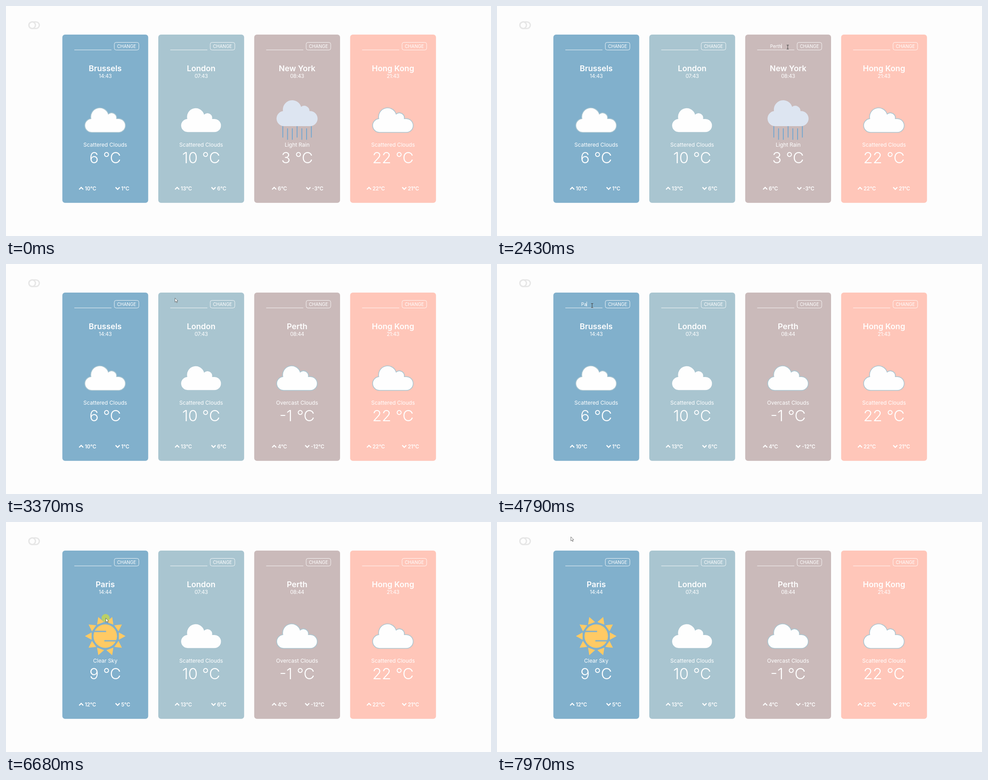
An HTML page for the animation above (8 s loop, 1086 px wide and 515 px high).

```html
<!DOCTYPE html>
<html lang="en">
<head>
<meta charset="utf-8">
<title>Weather cards</title>
<style>
html, body { margin: 0; width: 100%; height: 100%; overflow: hidden; background: #fdfdfd; }
svg { display: block; width: 1086px; height: 515px; font-family: Montserrat, Inter, "Open Sans", sans-serif; }
text { text-anchor: middle; white-space: pre; }
.city { font-size: 17.7px; font-weight: 600; }
.time { font-size: 11.7px; letter-spacing: -.35px; }
.sky { font-size: 12px; }
.temp { font-size: 34.5px; font-weight: 350; }
.range { font-size: 11.3px; font-weight: 600; text-anchor: start; }
.small { font-size: 11.4px; text-anchor: start; }
.day { font-size: 20.3px; font-weight: 350; }
.tiny { font-size: 10px; }
.line { fill: none; stroke: #fff; }
.thin { stroke-width: .85; }
</style>
</head>
<body>
<svg id="stage" viewBox="0 0 1086 515"></svg>
<script>
const LOOP = 8000;
const stage = document.getElementById('stage');
const SUN = '#ffca64', GREY = '#727072', PANEL = '#d8d3d0';
const TINTS = ['#81b0cc', '#a9c5d0', '#cababa', '#ffc6b9'];
const cardX = i => 222.2 + i * 214.8;
const label = (cls, x, y, s) => `<text class="${cls}" x="${x}" y="${y}">${s}</text>`;
const repeat = (n, fn) => Array.from({ length: n }, (_, i) => fn(i)).join('');

// Weather icons, centred on x = 0
const cloud = `<path d="M-30 283A15.4 15.4 0 0 1 -32 252.3A20.2 20.2 0 0 1 7 242A11.2 11.2 0 0 1 25.3 252.3
  H29.8A15.3 15.3 0 0 1 29.8 283Z" fill="#fefefe" stroke="#a9c5d0" stroke-width="1.6"/>`;

const drops = repeat(7, i => `M${-32 + i * 10.65} ${i % 3 ? 274 : 269}v25.5`);
const rain = `<path d="${drops}" stroke="#6ea5d1" stroke-width="1.8"/>
  <path d="M-29 269A17 17 0 0 1 -31.6 235.2A20.9 20.9 0 0 1 9 225.7A11.8 11.8 0 0 1 27.8 235.2H29A16.9 16.9 0 0 1 29 269Z" fill="#dde5f1"/>`;

const sun = bg => {
  const rays = repeat(10, i => {
    const angle = (i % 5 - 2) * 35 + (i < 5 ? 0 : 180);
    return `<path d="M45.5 0L30.5 -8.3V8.3Z" transform="rotate(${angle})"/>`;
  });
  return `<g transform="translate(0 255.5)" fill="${SUN}">${rays}<circle r="26.3"/>
    <path d="M-27 -10.5H2M-2 10.5H27" stroke="${bg}" stroke-width="2.8"/></g>`;
};

// Chevron and temperature, centred together on x; dir 1 points up
function range(x, dir, deg) {
  const width = 27.8 + 5 * String(deg).length;
  const left = x - width / 2;
  return `<path class="line" stroke-width="2.3" d="M${left} ${408.3 + 2.4 * dir}l4.6 ${-4.6 * dir}l4.6 ${4.6 * dir}"/>` +
    label('range', left + 12.6, 412.5, deg + '°C');
}

// A card is drawn around its own centre line
function card(id, i, city, time, icon, sky, temp, max, min) {
  return `<g id="${id}" transform="translate(${cardX(i)} 0)" fill="#fff">
    <rect x="-96" y="64" width="192.2" height="376.8" rx="6" fill="${TINTS[i]}"/>
    <path class="line thin" d="M-69.2 98.3H14"/>
    <rect class="line thin" x="20.3" y="81.5" width="55" height="17" rx="4"/>
    ${label('tiny', 47.8, 93.6, 'CHANGE')}
    ${label('city', 0, 146, city)}${label('time', 0, 161, time)}
    ${icon}
    ${label('sky', 0, 315.2, sky)}${label('temp', 0, 351.5, temp + ' °C')}
    ${range(-39.5, 1, max)}${range(39.5, -1, min)}
  </g>`;
}

function spinner(id, i) {
  const petals = repeat(12, n => {
    const k = n / 11;
    const rgb = [248 - 145 * k, 249 - 100 * k, 250 - 73 * k].map(Math.round);
    return `<ellipse cy="-40" rx="6" ry="12" transform="rotate(${n * 30})" fill="rgb(${rgb})"/>`;
  });
  return `<g transform="translate(${cardX(i)} 162.3)"><g id="${id}">${petals}</g></g>`;
}

function detail() {
  const rows = [8, 10, 10, 5, 3].map((deg, n) => {
    const y = n * 46.4;
    const icon = n < 4
      ? `<g transform="translate(720 ${64.8 + y}) scale(.37)">${cloud}</g>`
      : `<g transform="translate(720.5 253) scale(.36)">${sun(PANEL)}</g>`;
    return icon + label('day', 827, 171 + y, deg + '°C') +
      `<path d="M661 ${182.4 + y}H888.5" stroke="#aaa5a4" stroke-width=".85"/>`;
  }).join('');
  const arrow = (x, dir) => `<path fill="none" stroke="${GREY}" stroke-width="2"
    d="M${x} ${338.2 + 5 * dir}v${-9 * dir}m-2.8 ${2.6 * dir}l2.8 ${-2.8 * dir}l2.8 ${2.8 * dir}"/>`;
  return `<g id="detail" fill="${GREY}">
    <rect x="160.5" y="64" width="768" height="376.8" rx="6" fill="${PANEL}"/>
    ${label('city', 391, 170, 'Paris')}${label('time', 391, 185.6, '14:44')}
    <g transform="translate(391.3 -17)">${sun(PANEL)}</g>
    ${label('sky', 391, 298.2, 'Clear Sky')}${label('temp', 391, 334.4, '9 °C')}
    ${arrow(262.5, 1)}${label('small', 268, 342.6, '12°C')}
    ${arrow(495, -1)}${label('small', 500.5, 342.6, '5°C')}
    ${rows}
    <path d="M1018.2 38.5A9.2 9.2 0 1 1 1018.5 49.2" fill="none" stroke="#e6e6e6" stroke-width="3.4"/>
    <path d="M1014 33V41.8H1022.8Z" fill="#e6e6e6"/>
  </g>`;
}

const scattered = 'Scattered Clouds';
stage.innerHTML = `
  <rect width="1086" height="515" fill="#fdfdfd"/>
  <g fill="none" stroke="#e6e6e6" stroke-width="2.8">
    <rect x="51.2" y="35.6" width="23.4" height="14.8" rx="7.4"/><circle cx="58.6" cy="43" r="7.4"/></g>
  <g id="cards">
    ${card('brussels', 0, 'Brussels', '14:43', cloud, scattered, 6, 10, 1)}
    ${card('paris', 0, 'Paris', '14:44', sun(TINTS[0]), 'Clear Sky', 9, 12, 5)}
    ${card('london', 1, 'London', '07:43', cloud, scattered, 10, 13, 6)}
    ${card('newyork', 2, 'New York', '08:43', rain, 'Light Rain', 3, 6, -3)}
    ${card('perth', 2, 'Perth', '08:44', cloud, 'Overcast Clouds', -1, 4, -12)}
    ${card('hongkong', 3, 'Hong Kong', '21:43', cloud, scattered, 22, 22, 21)}
    ${spinner('spin0', 0)}${spinner('spin2', 2)}
  </g>
  ${detail()}
  <g id="field" fill="#fff"><text id="typed" class="tiny" y="93.5"></text>
    <path id="caret" class="line" d="M0 84.5V95"/></g>
  <g id="cursor">
    <circle id="click" r="9" fill="#d8e030" opacity=".65"/>
    <path id="arrow" d="M.4 .2V9.4L2.6 7.4L4.2 10.8L5.6 10.1L4.1 6.9L6.9 6.7Z" fill="#fff" stroke="#444" stroke-width=".75"/>
    <path id="beam" d="M-2.4 -4.5H2.4M0 -4.5V4.5M-2.4 4.5H2.4" fill="none" stroke="#444" stroke-width="1.1"/>
  </g>`;

const $ = id => document.getElementById(id);
const show = (id, on) => { $(id).style.display = on ? '' : 'none'; };
const within = (t, a, b) => t >= a && t < b;

// Pointer stops: time, x, y
const stops = [[40, 932, 444], [780, 458, 110], [1610, 651, 92], [2740, 651, 92], [3340, 378, 76],
  [4340, 213, 93], [5640, 213, 93], [6070, 480, 195], [6640, 223, 215], [6880, 223, 215],
  [7400, 1020, 42], [7540, 1020, 42], [7640, 526, 212], [7740, 331, 46], [7940, 165, 33]];

function pointer(t) {
  const n = stops.findIndex(s => s[0] > t);
  if (n < 1) return stops.at(n).slice(1);
  const [t0, x0, y0] = stops[n - 1], [t1, x1, y1] = stops[n];
  const k = (t - t0) / (t1 - t0);
  return [x0 + (x1 - x0) * k, y0 + (y1 - y0) * k];
}

// A new city for a card: focus, loading and ready times
const swaps = [
  { i: 2, from: 'newyork', to: 'perth', word: 'Perth', focus: 1710, load: 2470, ready: 2770 },
  { i: 0, from: 'brussels', to: 'paris', word: 'Paris', focus: 4460, load: 5240, ready: 5700 }
];
const clicks = [1710, 4460, 6640, 7440];
const KEY = 120;

function type(t, { i, word, focus }) {
  const count = Math.max(0, Math.floor((t - focus - 60) / KEY));
  $('typed').textContent = word.slice(0, count);
  $('field').setAttribute('transform', `translate(${cardX(i) - 27.6} 0)`);
  const half = count ? $('typed').getComputedTextLength() / 2 : 0;
  $('caret').setAttribute('transform', `translate(${half + .3} 0)`);
}

function draw(t) {
  const tick = Math.floor((t - 40) / 100) * 100 + 40;
  const inDetail = within(t, 6880, 7740);
  show('cards', !inDetail);
  show('detail', inDetail);

  for (const s of swaps) {
    show(s.from, t < s.load);
    show(s.to, t >= s.ready);
    show('spin' + s.i, within(t, s.load, s.ready));
    $('spin' + s.i).setAttribute('transform', `rotate(${(tick - 5540) / 100 * 30})`);
  }
  const active = swaps.find(s => within(t, s.focus, s.load));
  show('field', !!active);
  if (active) type(t, active);

  const [x, y] = pointer(tick);
  const beam = within(t, 1500, 2470) || within(t, 4050, 5240);
  show('cursor', t >= 40);
  show('beam', beam);
  show('arrow', !beam);
  show('click', clicks.some(c => within(t, c, c + 100)));
  $('cursor').setAttribute('transform', `translate(${x} ${y})`);
}

const start = performance.now();
function frame() {
  draw((performance.now() - start) % LOOP);
  requestAnimationFrame(frame);
}
frame();
</script>
</body>
</html>
```
